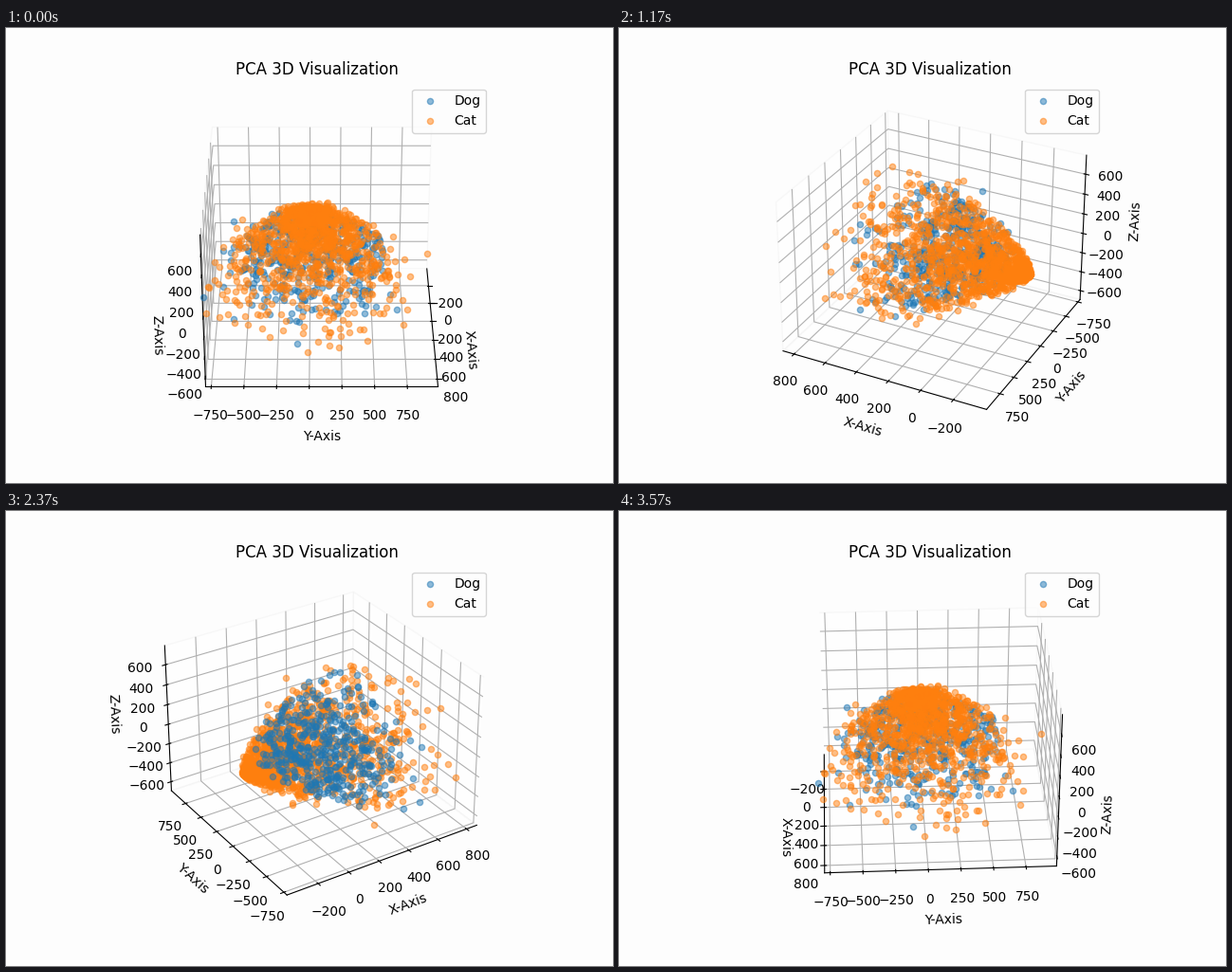
A matplotlib script for the animation above (3600 ms loop, 640x480 px).

```python
import numpy as np
import matplotlib.pyplot as plt
from matplotlib.animation import FuncAnimation

FRAMES, INTERVAL = 120, 30
PAPER = "#fdfdfd"
TIP = -323
LIMITS = {"xlim": (-399, 872), "ylim": (-793, 985), "zlim": (-695, 788)}

rng = np.random.default_rng(7)


def cloud(n, a, b, start, length, width):
    """Points in a bell that opens along x from a dense tip."""
    depth = start + length * rng.beta(a, b, n)
    reach = width * np.minimum(6.3 * depth ** 0.7, 600)
    straggle = 1 + 0.35 * rng.random(n) ** 10
    radius = reach * straggle * rng.random(n) ** 0.56
    angle = rng.uniform(0, 2 * np.pi, n)
    y = 1.3 * radius * np.cos(angle)
    z = 0.95 * radius * np.sin(angle)
    return TIP + depth, y, z


dogs = cloud(450, 3.2, 4.0, 80, 980, 0.9)
cats = cloud(1150, 0.9, 1.75, 0, 1120, 1.0)

fig = plt.figure(figsize=(6.4, 4.8), dpi=100, facecolor=PAPER)
ax = fig.add_subplot(projection="3d", facecolor=PAPER)
for points, name in ((dogs, "Dog"), (cats, "Cat")):
    ax.scatter(*points, alpha=0.5, label=name, depthshade=False)

ax.set(xlabel="X-Axis", ylabel="Y-Axis", zlabel="Z-Axis", **LIMITS)
ax.set_title("PCA 3D Visualization")
ax.legend(facecolor=PAPER)
for axis in (ax.xaxis, ax.yaxis, ax.zaxis):
    axis.pane.set_facecolor((1, 1, 1, 0))
    axis.pane.set_edgecolor("#f2f2f2")


def turn(i):
    ax.view_init(elev=30, azim=i * 360 / FRAMES)
    return []


anim = FuncAnimation(fig, turn, frames=FRAMES, interval=INTERVAL,
                     init_func=lambda: [], repeat=True, repeat_delay=0)
plt.show()
```
